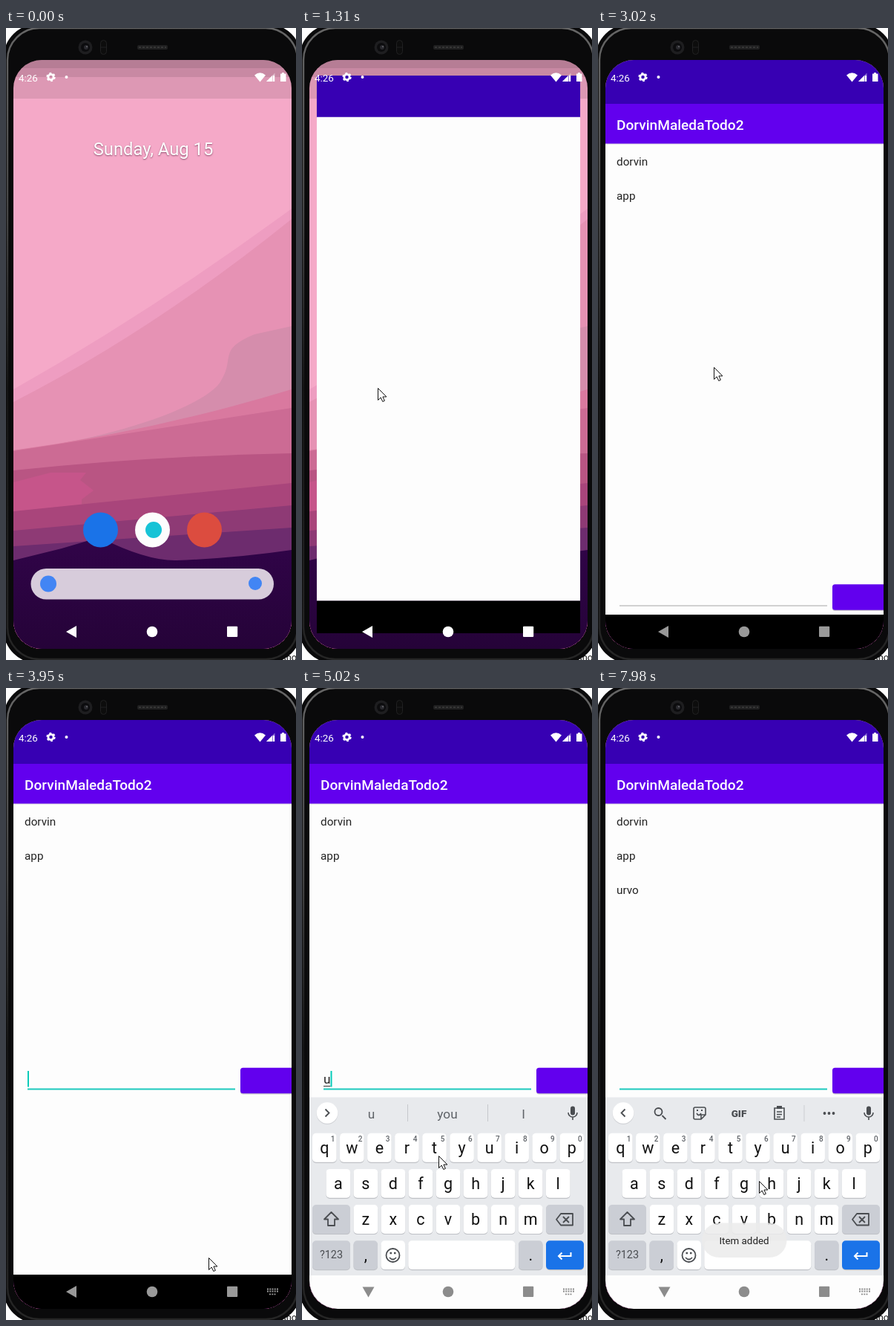
Recreate the animation shown at these times as an HTML page. Size 391x850 px, loop 8 s.

```html
<!DOCTYPE html>
<html lang="en">
<head>
<meta charset="utf-8">
<title>Todo list demo</title>
<style>
  html, body { margin: 0; width: 100%; height: 100%; overflow: hidden; background: #fdfdfd; }
  svg { display: block; }
  text { font-family: Roboto, sans-serif; white-space: pre; }
  .mid { text-anchor: middle; }
  .line { fill: none; stroke: #4a4d51; stroke-width: 1.8; }
  .thin { stroke-width: 1.6; }
  .date { font-size: 23.8px; fill: #fff; text-shadow: 0 1px 2px rgba(70, 20, 50, .6); }
</style>
</head>
<body>
<svg width="391" height="850" viewBox="0 0 391 850">
  <defs>
    <clipPath id="screen"><rect x="10" y="43" width="375" height="792" rx="38"/></clipPath>
    <linearGradient id="edge" x1="0" y1="0" x2="0" y2="850" gradientUnits="userSpaceOnUse">
      <stop offset="0" stop-color="#666"/>
      <stop offset=".3" stop-color="#444"/>
      <stop offset=".57" stop-color="#141414"/>
      <stop offset="1" stop-color="#262626"/>
    </linearGradient>
    <linearGradient id="ground" x1="0" y1="0" x2="0" y2="1">
      <stop offset="0" stop-color="#310449"/>
      <stop offset="1" stop-color="#250338"/>
    </linearGradient>
  </defs>

  <text x="371" y="851" font-size="13" fill="#222">sho</text>
  <rect x="-4" y="-6" width="403" height="861" rx="48" fill="#0a0a0b"/>
  <rect x="2" y="0" width="391" height="849" rx="43" fill="none" stroke="url(#edge)" stroke-width="2.4"/>
  <circle cx="107" cy="26" r="9.5" fill="#1e1e20"/>
  <circle cx="107" cy="26" r="6" fill="#0c0c0e"/>
  <circle cx="108" cy="26" r="3" fill="#2a2a2f"/>
  <circle cx="109" cy="25" r="1" fill="#66666b"/>
  <rect x="127.5" y="16.5" width="8" height="19" rx="4" fill="#0d0d0d" stroke="#212122"/>
  <path d="M128 26h7" stroke="#212122"/>
  <rect x="177" y="23" width="41" height="6" rx="2" fill="#202021"/>
  <path d="M179 26h37" stroke="#363636" stroke-width="2" stroke-dasharray="3 2"/>

  <g clip-path="url(#screen)">
    <g id="wall"></g>
    <g id="home">
      <text class="mid date" x="198.5" y="170.5">Sunday, Aug 15</text>
      <circle cx="127.5" cy="675" r="23.5" fill="#1a73e8"/>
      <circle cx="197.5" cy="675" r="23.5" fill="#fdfdfd"/>
      <circle cx="199" cy="675" r="11" fill="#17c3d6"/>
      <circle cx="267.5" cy="675" r="23.5" fill="#dc4c3f"/>
      <rect x="33.5" y="727" width="327.5" height="41.5" rx="20.75" fill="#d7ccdb"/>
      <circle cx="57" cy="747.5" r="11" fill="#4285f4"/>
      <circle cx="336" cy="747" r="9" fill="#4285f4"/>
    </g>

    <g id="app">
      <path d="M10 43h375v60h-375z" fill="#3700b3"/>
      <path d="M10 102h375v687h-375z" fill="#fdfdfd"/>
      <path d="M10 789h375v46h-375z"/>
      <g id="content">
        <path d="M10 155h375v1.5h-375z" opacity=".12"/>
        <path d="M10 102h375v53.5h-375z" fill="#6200ee"/>
        <text x="25" y="136.5" font-size="19.1" font-weight="500" fill="#fff">DorvinMaledaTodo2</text>
        <g font-size="15.3" fill="#222">
          <text x="25" y="184.5">dorvin</text>
          <text x="25" y="230.5">app</text>
          <text id="added" x="25" y="276.5"></text>
        </g>
        <g id="row">
          <path id="rule" d="M29 539.5h280"/>
          <text id="field" x="29" y="532" font-size="17.2" fill="#222"></text>
          <path id="compose" stroke="#333"/>
          <path id="caret" d="M0 515v21.5" stroke="#03cbb9" stroke-width="2"/>
          <rect x="316" y="512" width="90" height="34.5" rx="3.5" opacity=".2"/>
          <rect x="316" y="510.7" width="90" height="34.5" rx="3.5" fill="#6200ee"/>
        </g>
      </g>
    </g>

    <g id="board">
      <path d="M10 550.5h375v239.5h-375z" fill="#e8eaed"/>
      <circle cx="34" cy="572.5" r="14.5" fill="#d2d4d8"/>
      <circle cx="34" cy="571.5" r="14.3" fill="#fff"/>
      <path id="chevron" class="line"/>
      <rect x="362" y="562.5" width="6" height="12" rx="3" fill="#4a4d51"/>
      <path class="line thin" d="M359 571a6 6 0 0 0 12 0M365 577v4"/>
      <g id="tools">
        <path class="line" d="M86.5 575l5 5M86.5 570a5 5 0 1 1-10 0a5 5 0 1 1 10 0"/>
        <path class="line thin" d="M131 564h12a2 2 0 0 1 2 2v8l-6 6h-8a2 2 0 0 1-2-2v-12a2 2 0 0 1 2-2zM139 580v-6h6M133 572q3 5 6 0"/>
        <path d="M133 567h2v2h-2zM139 567h2v2h-2z" fill="#4a4d51"/>
        <text class="mid" x="190" y="577" font-size="13.5" font-weight="900" fill="#4a4d51">GIF</text>
        <path class="line thin" d="M238 565h13v15h-13zM241 570h7M241 573.5h7M241 577h5"/>
        <path d="M241 562h7v4h-7z" fill="#4a4d51"/>
        <path d="M278 561v22" stroke="#cbcdd1"/>
        <path d="M305.5 572h.01M311.5 572h.01M317.5 572h.01" stroke="#4a4d51" stroke-width="3.8" stroke-linecap="round"/>
      </g>
      <g id="words" font-size="17.2" fill="#5f6368">
        <path d="M142.5 560v23M250.5 560v23" stroke="#c6c8cc"/>
        <text class="mid" x="93.5" y="578.5"></text>
        <text class="mid" x="196" y="578.5"></text>
        <text class="mid" x="298.5" y="578.5"></text>
      </g>
      <g id="keys"></g>
      <path class="line" d="M39.5 705l9.5 9.5h-5v8.5h-9v-8.5h-5z" stroke-linejoin="round"/>
      <path class="line" d="M349 707h16v15.5h-16l-6-7.75zM352 711l8 8M360 711l-8 8" stroke-linejoin="round"/>
      <g class="line"><circle cx="122.5" cy="763" r="9"/><path d="M118 766q4.5 5 9 0"/></g>
      <path d="M118.5 760h2.5M124 760h2.5" stroke="#4a4d51" stroke-width="2.5"/>
      <path d="M362.5 759v5h-16M350.5 759.5l-4.5 4.5l4.5 4.5" fill="none" stroke="#fff" stroke-width="2"/>
    </g>

    <g id="toast">
      <rect x="140" y="719.5" width="114.5" height="46.5" rx="23.25" fill="#ececec" opacity=".86"/>
      <text class="mid" x="197" y="748" font-size="13.4" fill="#222">Item added</text>
    </g>

    <path id="lightBar" d="M10 790h375v45h-375z" fill="#fdfdfd"/>
    <g id="nav">
      <path id="back" d="M81 812l14-8v16z"/>
      <circle cx="197" cy="812" r="7.3"/>
      <rect x="298" y="804.8" width="14.2" height="14.2" rx="1"/>
      <path id="switcher" d="M352 808.5h15M352 811.5h15M355 815.3h9" stroke-width="1.8" stroke-dasharray="2 1.25"/>
    </g>

    <g fill="#fff">
      <text x="17" y="71.5" font-size="13.4">4:26</text>
      <circle cx="60.5" cy="66" r="3.6" fill="none" stroke="#fff" stroke-width="2.7"/>
      <circle cx="60.5" cy="66" r="5.3" fill="none" stroke="#fff" stroke-width="1.8" stroke-dasharray="2.8 2.75"/>
      <circle cx="81.5" cy="66" r="2"/>
      <path d="M335 63.5q7.5-6.5 15 0l-7.5 9z"/>
      <path d="M351 72l11.5-11.5v11.5z" opacity=".45"/>
      <path d="M351 72l8-8v8zM360 64h2v8h-2z"/>
      <path d="M370 61.5h2v-1.5h3v1.5h2.5v10.5h-7.5z"/>
    </g>
  </g>
  <path id="cursor" d="M.5.5v16l3.7-3.5l2.6 5.5l2.6-1.2l-2.5-5.3h5z" fill="#fff" stroke="#111"/>
</svg>
<script>
const LOOP = 8000, WORD = "urvo";
const $ = id => document.getElementById(id);
const add = (parent, tag, attrs, text = "") => {
  const node = document.createElementNS("http://www.w3.org/2000/svg", tag);
  for (const name in attrs) node.setAttribute(name, attrs[name]);
  node.textContent = text;
  parent.append(node);
};
const set = (id, name, value) => $(id).setAttribute(name, value);
const show = (id, on) => $(id).style.display = on ? "" : "none";
const span = (t, from, to) => Math.min(1, Math.max(0, (t - from) / (to - from)));
const mix = (a, b, k) => a + (b - a) * k;

// Wallpaper: ridges run from the left edge to the right one, then fill downwards
const slope = (fill, curve) => add($("wall"), "path", { d: `${curve}V835H10z`, fill });
const ridge = (fill, left, right, bow = 0) =>
  slope(fill, `M10 ${left}Q197 ${(left + right) / 2 + 2 * bow} 385 ${right}`);
ridge("#f5a9c8", 43, 43);
ridge("#ee9dc1", 486, 243, 8);
ridge("#e692b4", 503, 257, 14);
slope("#d58dac", "M10 568C150 552 268 508 289 476S284 433 335 412L385 401");
ridge("#d9799f", 568, 486, 8);
ridge("#cc6b94", 569, 511);
ridge("#b95583", 595, 572, -4);
slope("#c6558a", "M10 611L60 598H108L100 608L118 622L102 634");
ridge("#a9457b", 650, 612);
ridge("#8e3a75", 676, 642);
ridge("#6d2c6e", 697, 672);
slope("url(#ground)", "M10 716L75 700L126 685Q190 717 230 716Q310 713 385 702");
for (const bottom of [54, 66, 95])
  add($("wall"), "path", { d: `M10 43H385V${bottom}H10z`, fill: "#553648", opacity: .15 });

// Keyboard
const GREY = "#cbced5", PITCH = 37.05;
function key(x, y, w, label = "", fill = "#fff", size = 21.5) {
  const ink = size < 20 ? "#4a4d51" : "#111";
  add($("keys"), "rect", { x, y: y + 1.1, width: w, height: 39, rx: 5, fill: "#bfc1c6" });
  add($("keys"), "rect", { x, y, width: w, height: 38.9, rx: 5, fill });
  add($("keys"), "text", { class: "mid", x: x + w / 2, y: y + 19 + size * .36, "font-size": size, fill: ink }, label);
}
["qwertyuiop", "asdfghjkl", "zxcvbnm"].forEach((letters, row) =>
  [...letters].forEach((letter, i) => {
    const x = 14 + PITCH * (row / 2 + (row > 1 ? .5 : 0) + i);
    key(x, 598.8 + 48.1 * row, 32.6, letter);
    if (!row) add($("keys"), "text", { class: "mid", x: x + 27.5, y: 609.5, "font-size": 10,
      "font-weight": 500, fill: "#5f6368" }, (i + 1) % 10);
  }));
for (const x of [14, 329]) key(x, 695, 51, "", GREY);
key(14, 743.2, 51, "?123", GREY, 14.4);
key(69.5, 743.2, 32.5, ",", GREY);
key(106.5, 743.2, 32.5);
key(143.3, 743.2, 144);
key(292, 743.2, 32.5, ".", GREY);
key(329, 743.2, 51, "", "#1a73e8");

// Key moments in ms
const LAUNCH = 1310, LOADED = 2090, FOCUS = 3710, KEYBOARD = 4070, ADDED = 7110;
const strokes = [4750, 5320, 5860, 6130];

// Pointer stops: time, x, y
const stops = [
  [500, 296, 610], [640, 255, 630], [1010, 107, 505], [LAUNCH, 102, 482], [1700, 102, 482],
  [LOADED, 207, 495], [2360, 205, 500], [2630, 110, 211], [2870, 76, 255], [3260, 290, 793],
  [3940, 273, 766], [4100, 273, 766], [4620, 252, 618], [5010, 184, 629], [5320, 151, 629],
  [5980, 45, 671], [6100, 45, 671], [6210, 147, 641], [6340, 324, 587], [6710, 379, 528],
  [ADDED, 372, 522], [7940, 217, 663]
];
function pointer(t) {
  const next = stops.findIndex(stop => stop[0] > t);
  if (next < 1) return stops.at(next).slice(1);
  const a = stops[next - 1], b = stops[next];
  return [1, 2].map(n => Math.round(mix(a[n], b[n], span(t, a[0], b[0]))));
}

// Movement advances in even steps, like a screen capture
const snap = t => 485 + Math.floor((t - 485) / 133.2) * 133.2;

function drawField(t) {
  const focused = t >= FOCUS, done = t >= ADDED;
  const text = done ? "" : WORD.slice(0, strokes.filter(s => s <= t).length);
  const edited = [FOCUS, ...strokes, ADDED].findLast(s => s <= t);
  set("row", "transform", `translate(0 ${t >= FOCUS + 120 ? 0 : 237.5})`);
  set("rule", "stroke", focused ? "#1cc9bd" : "#a5a5a5");
  set("rule", "stroke-width", focused ? 2 : 1);
  $("field").textContent = text;
  $("added").textContent = done ? WORD : "";
  const width = text ? $("field").getComputedTextLength() : 0;
  set("compose", "d", `M29 535.5h${width}`);
  set("caret", "transform", `translate(${30 + width} 0)`);
  show("caret", focused && (t - edited) % 1100 < 580);

  const words = text.length === 1 ? [text, "you", "I"] : [text, text.toUpperCase(), ""];
  $("words").querySelectorAll("text").forEach((node, i) => node.textContent = words[i]);
  show("words", text);
  show("tools", !text);
  set("chevron", "d", text ? "M31.5 566.5l5 5l-5 5" : "M36.5 566.5l-5 5l5 5");
}

function drawNav(t, step) {
  const light = t >= KEYBOARD;
  const shade = light ? 140 : Math.round(mix(255, 153, span(step, 1820, 2870)));
  const tone = `rgb(${shade},${shade},${shade})`;
  show("lightBar", light);
  show("switcher", t >= FOCUS + 120);
  set("nav", "fill", tone);
  set("switcher", "stroke", tone);
  set("back", "transform", `rotate(${-90 * span(step, 3950, 4370)} 89 811.5)`);
}

function draw(t) {
  const step = snap(t);
  show("home", t < LAUNCH + 120);
  show("app", t >= LAUNCH);
  const zoom = t < LAUNCH + 120 ? .947 : 1;
  set("app", "transform", `translate(197.5 438.5) scale(${zoom}) translate(-197.5 -438.5)`);
  set("content", "opacity", t < LOADED ? 0 : t < LOADED + 120 ? .22 : 1);
  drawField(t);
  show("board", t >= KEYBOARD);
  set("board", "transform", `translate(0 ${t < KEYBOARD + 160 ? 130 : 0})`);
  set("toast", "opacity", span(step, ADDED, ADDED + 380));
  drawNav(t, step);
  set("cursor", "transform", `translate(${pointer(step)})`);
  show("cursor", t >= 500);
}

const start = performance.now();
function frame() {
  draw((performance.now() - start) % LOOP);
  requestAnimationFrame(frame);
}
frame();
</script>
</body>
</html>
```
